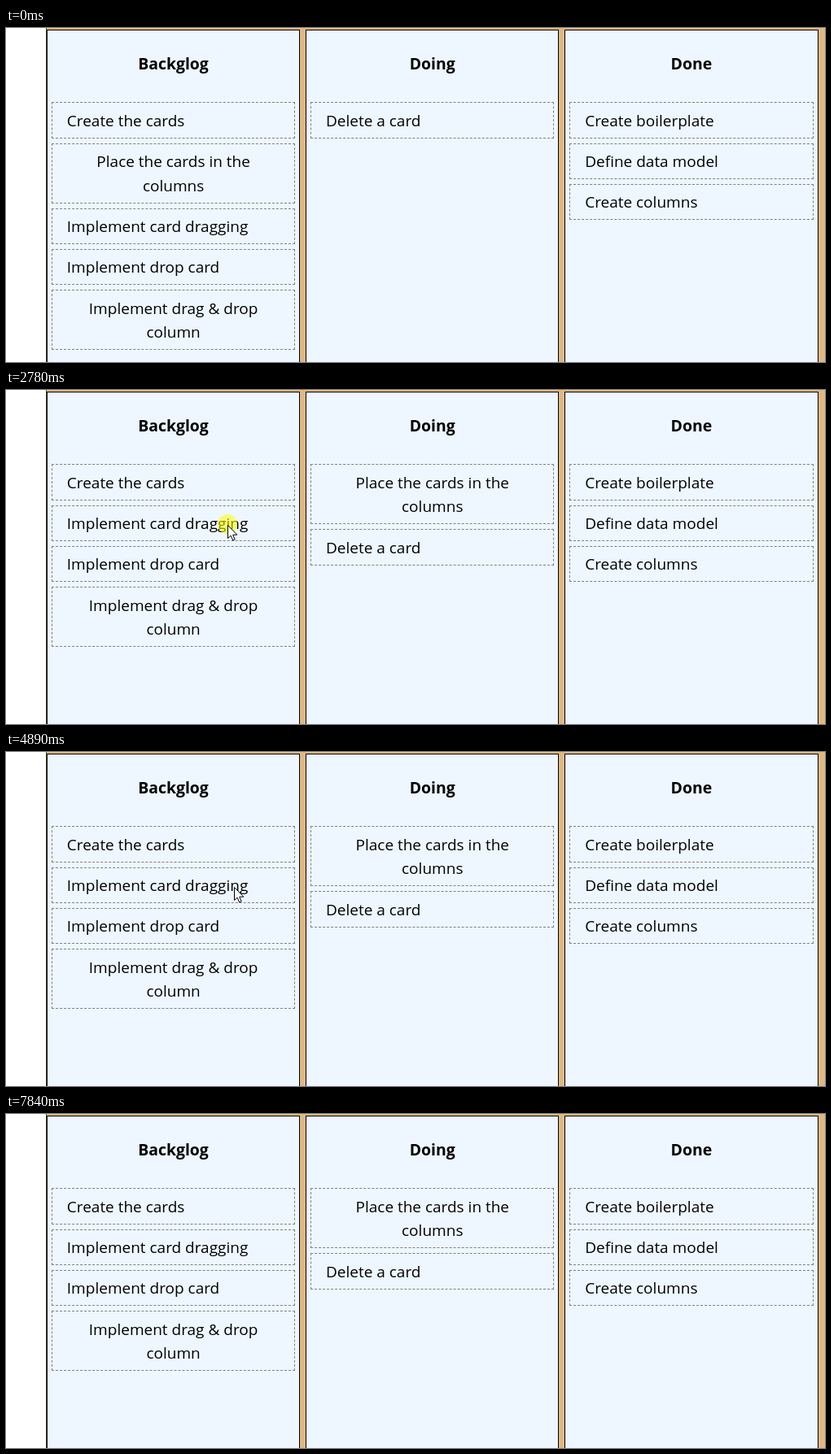
Recreate the animation shown at these times as an HTML page. Size 1006 by 411 pixels, loop 8620 ms.

```html
<!DOCTYPE html>
<html lang="en">
<head>
<meta charset="utf-8">
<title>Card board</title>
<style>
  html, body { margin: 0; width: 100%; height: 100%; overflow: hidden; background: #fff; }
  body { position: relative; font: 19px/30px "Open Sans", "Noto Sans", sans-serif; color: #000; }
  div, svg { position: absolute; box-sizing: border-box; }
  #board { left: 49px; top: 0; width: 960px; height: 420px; background: #deb887; border-left: 1px solid #4a4a1c; }
  .column { top: 2px; height: 420px; border: 1px solid #000; background: #eef7ff; }
  .title { left: 0; right: 0; top: 26px; text-align: center; font-size: 19.4px; font-weight: 700; }
  .card { border: 1px dashed #808080; white-space: nowrap; }
  .line { left: 17.8px; }
  .double .line { left: 0; right: 0; text-align: center; }
  .ghost { background: #fafcff; z-index: 1; }
  #pointer { left: 0; top: 0; width: 1px; height: 1px; overflow: visible; z-index: 2; }
</style>
</head>
<body>
<div id="board"></div>
<svg id="pointer">
  <circle id="press" cy="-1" r="12" fill="#ff0" fill-opacity=".55"/>
  <path id="arrow" d="M.5 .5V16.5L4.2 13.2 6.7 19 9.2 17.9 6.7 12.2H11.8Z" fill="#fff" stroke="#000"/>
  <rect id="badge" x="3.5" y="15.5" width="10" height="7" fill="#fff" stroke="#000" stroke-dasharray="1 1"/>
  <g id="denied" fill="none" stroke="#333000" stroke-width="2">
    <circle r="8"/><path d="M-5.6 -5.6L5.6 5.6"/>
  </g>
</svg>
<script>
const LOOP = 8620, DROP = 1750, LAG = 20;
const PITCH = 318.2, INSET = 6.2, COLUMN_W = 311.4, CARD_W = 299.2;
const $ = id => document.getElementById(id);
const pointer = $("pointer");
const columnX = i => 49.8 + PITCH * i;

function add(cls, parent = document.body, text = "") {
  const el = document.createElement("div");
  el.className = cls;
  el.textContent = text;
  parent.append(el);
  return el;
}

["Backglog", "Doing", "Done"].forEach((name, i) => {
  const column = add("column");
  column.style.left = columnX(i) + "px";
  column.style.width = COLUMN_W + "px";
  add("title", column, name);
});

function card(...lines) {
  const el = add("card" + (lines.length > 1 ? " double" : ""));
  return { el, lines: lines.map(text => add("line", el, text)) };
}

const create = card("Create the cards");
const place = card("Place the cards in the", "columns");
const dragging = card("Implement card dragging");
const dropping = card("Implement drop card");
const columnDrag = card("Implement drag & drop", "column");
const remove = card("Delete a card");
const done = ["Create boilerplate", "Define data model", "Create columns"].map(s => card(s));

const before = [[create, place, dragging, dropping, columnDrag], [remove], done];
const after = [[create, dragging, dropping, columnDrag], [place, remove], done];
let current;

function arrange(columns) {
  if (columns === current) return;
  current = columns;
  columns.forEach((list, i) => {
    const x = columnX(i) + INSET;
    let y = 91.4;
    for (const c of list) {
      const extra = 29.83 * (c.lines.length - 1);
      const top = Math.round(y);
      const h = Math.round(y + 44.17 + extra) - top;
      c.box = { x, y: top, h };
      Object.assign(c.el.style, { left: x + "px", top: top + "px", width: CARD_W + "px", height: h + "px" });
      c.lines.forEach((line, n) => {
        line.style.top = Math.round(y + 29.6 + 29.4 * n) - 23 - top + "px";
      });
      y += 50.17 + extra;
    }
  });
}

// Translucent copy of a card that fades with distance from the grab point.
function drag(card, press, end, x, y) {
  const ghost = card.el.cloneNode(true);
  ghost.classList.add("ghost");
  ghost.style.maskImage =
    `radial-gradient(240px 40px at ${x - card.box.x}px ${y - card.box.y}px, rgba(0,0,0,.65), transparent)`;
  document.body.append(ghost);
  return { card, ghost, press, start: press + 50, end, x, y };
}

arrange(before);
const drags = [drag(place, 1040, DROP, 214, 174)];
arrange(after);
drags.push(
  drag(dragging, 2780, 4300, 273, 165),
  drag(dropping, 5400, 7140, 260, 202)
);

const ease = {
  both: u => (1 - Math.cos(Math.PI * u)) / 2,
  in: u => u * u,
  out: u => 1 - (1 - u) ** 2
};

// Pointer moves: start, end, x, y, easing; it rests in between.
const entry = { x: 855, y: 400 };
const moves = [
  [170, 870, 214, 174, "out"],
  [1040, 1430, 509, 98], [1430, 1500, 494, 99],
  [2000, 2560, 272, 166],
  [2780, 3600, 567, 233], [3890, 4140, 556, 240],
  [4300, 4890, 280, 166],
  [5070, 5330, 260, 202],
  [5420, 5630, 331, 219, "in"], [5630, 5880, 532, 224, "out"],
  [5950, 6350, 599, 230], [6350, 6960, 582, 225],
  [7390, 7840, 900, 416, "in"]
];

function at(t) {
  let { x, y } = entry;
  for (const [start, end, toX, toY, kind = "both"] of moves) {
    if (t <= start) break;
    const u = ease[kind](Math.min(1, (t - start) / (end - start)));
    x += (toX - x) * u;
    y += (toY - y) * u;
  }
  return [x, y];
}

function overCard(x, y) {
  return current.flat().some(({ box }) =>
    x >= box.x && x < box.x + CARD_W && y >= box.y && y < box.y + box.h);
}

const show = (el, on) => { el.style.display = on ? "" : "none"; };

function draw(t) {
  arrange(t < DROP ? before : after);
  const [x, y] = at(t).map(Math.round);
  const pressed = drags.find(d => t >= d.press && t < d.end);
  const active = pressed && t >= pressed.start ? pressed : null;

  for (const d of drags) {
    show(d.ghost, d === active);
    d.card.el.style.opacity = d === active ? 0.36 : 1;
  }
  if (active) {
    const [gx, gy] = at(t - LAG);
    active.ghost.style.transform =
      `translate(${Math.round(gx - active.x)}px, ${Math.round(gy - active.y)}px)`;
  }

  const allowed = overCard(x, y);
  show(pointer, t >= 170 && t < 7840);
  show($("press"), pressed);
  show($("arrow"), !active || allowed);
  show($("badge"), active && allowed);
  show($("denied"), active && !allowed);
  pointer.style.transform = `translate(${x}px, ${y}px)`;
}

const began = performance.now();
function tick() {
  draw((performance.now() - began) % LOOP);
  requestAnimationFrame(tick);
}
tick();
</script>
</body>
</html>
```
